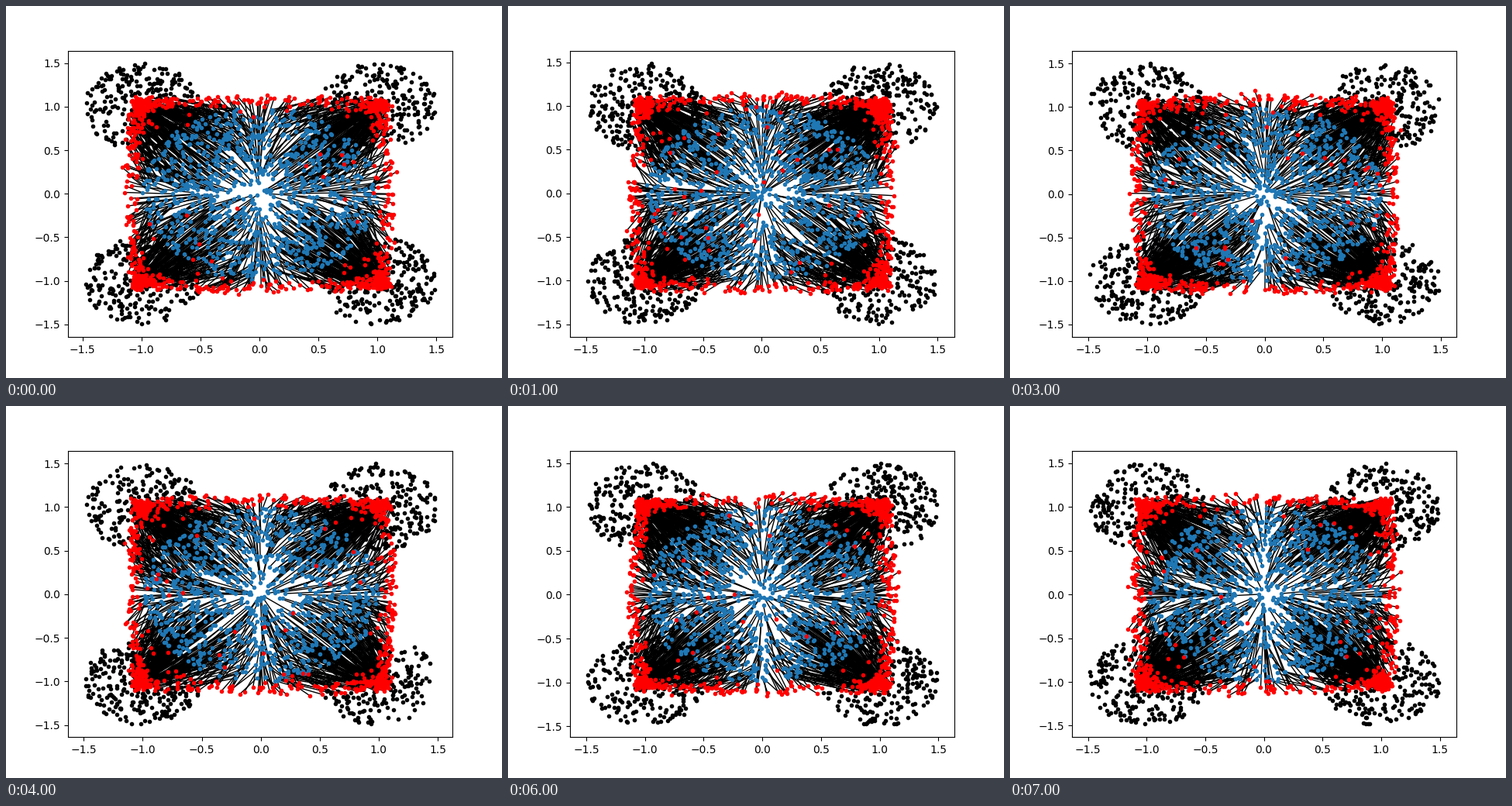
These frames come from a looping animation (640x480 px, 8 s). A matplotlib script:

```python
import numpy as np
import matplotlib.pyplot as plt
from matplotlib.animation import FuncAnimation
from matplotlib.collections import LineCollection

COUNT = 1024
STEPS = 8
STEP_MS = 1000
MARGIN = 0.05


def disc(rng, radius):
    """Uniform samples in a disc around the origin."""
    r = radius * np.sqrt(rng.random(COUNT))
    a = rng.uniform(0, 2 * np.pi, COUNT)
    return np.column_stack([r * np.cos(a), r * np.sin(a)])


def corner_discs(rng):
    """Samples of four discs centred on (±1, ±1)."""
    return disc(rng, 0.5) + rng.choice([-1, 1], (COUNT, 2))


def transport(pts, rng):
    """Push the disc towards the corners of a slightly bulging square."""
    r = np.hypot(*pts.T)[:, None]
    pull = np.tanh(5.2 * pts / np.sqrt(r ** 2 + 0.27))
    bulge = 0.07 * (1 - pull[:, ::-1] ** 2)
    scale = 0.95 + 0.11 * r + bulge
    return pull * scale + rng.normal(0, 0.022, pts.shape)


fig, ax = plt.subplots(figsize=(6.4, 4.8), dpi=100)
target_dots, = ax.plot([], [], "k.")
links = ax.add_collection(LineCollection([], colors="k", linewidths=1, zorder=2))
source_dots, = ax.plot([], [], ".", color="tab:blue", zorder=2.1)
moved_dots, = ax.plot([], [], "r.", zorder=2.2)


def draw(step):
    rng = np.random.default_rng(40 + step)
    target = corner_discs(rng)
    source = disc(rng, 1)
    moved = transport(source, rng)
    for dots, pts in ((target_dots, target), (source_dots, source), (moved_dots, moved)):
        dots.set_data(*pts.T)
    links.set_segments(np.stack([source, moved], axis=1))

    # The axes refit to each new sample
    low, high = target.min(axis=0), target.max(axis=0)
    pad = MARGIN * (high - low)
    ax.set(xlim=(low[0] - pad[0], high[0] + pad[0]),
           ylim=(low[1] - pad[1], high[1] + pad[1]))
    return target_dots, links, source_dots, moved_dots


anim = FuncAnimation(fig, draw, frames=STEPS, interval=STEP_MS,
                     repeat=True, repeat_delay=0, blit=False)
plt.show()
```
